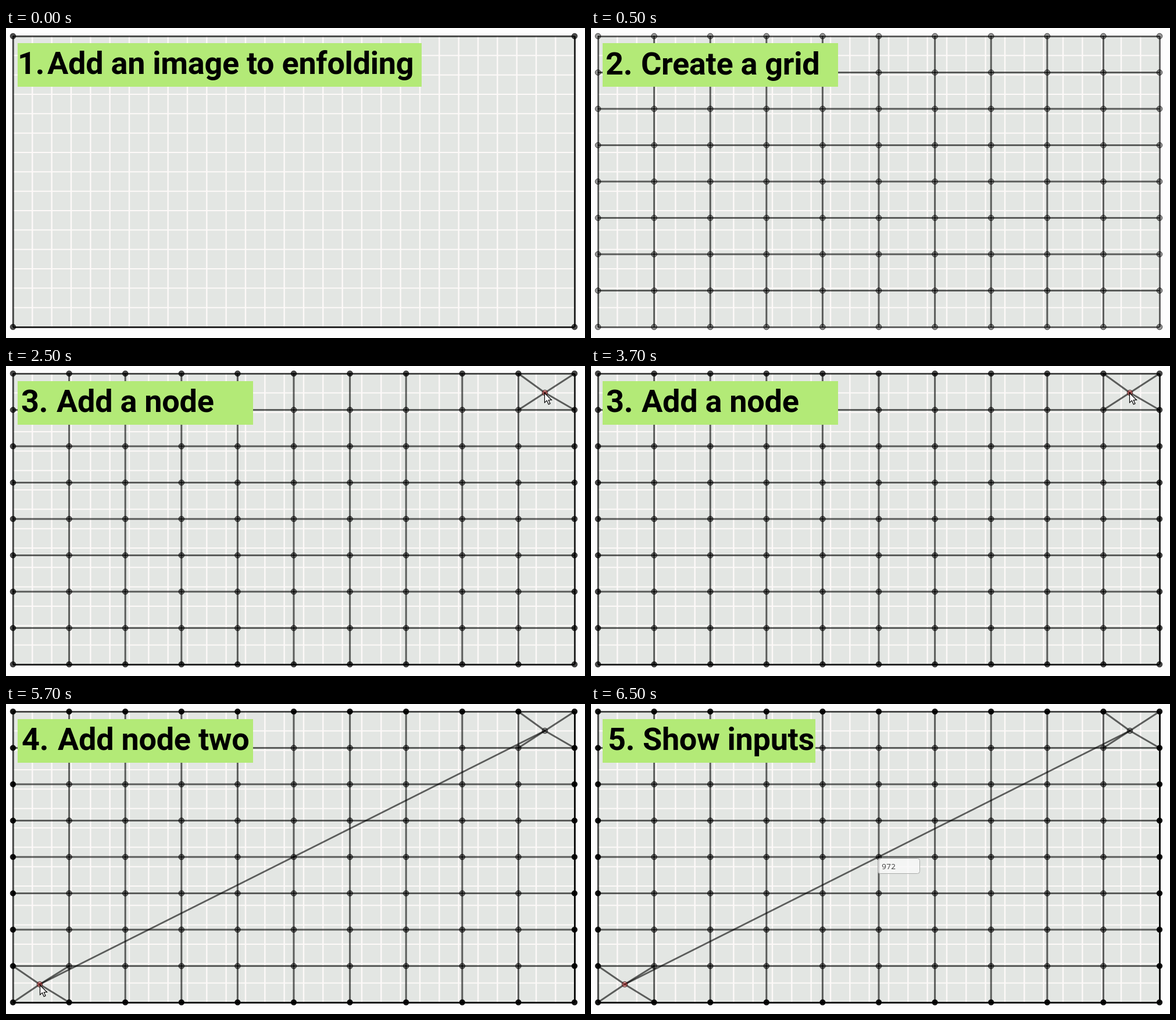
An HTML page with a canvas for the animation above (8 s loop, 996x533 px).

```html
<!DOCTYPE html>
<html lang="en">
<head>
<meta charset="utf-8">
<title>Grid steps</title>
<style>
html, body { margin: 0; width: 100%; height: 100%; overflow: hidden; background: #fdfdfd; }
canvas { display: block; }
</style>
</head>
<body>
<canvas id="stage" width="996" height="533"></canvas>
<script>
const ctx = document.getElementById('stage').getContext('2d');
const LOOP = 8000;
const LEFT = 12, RIGHT = 978, HEIGHT = 500, COLS = 10, ROWS = 8;
const CELL_W = (RIGHT - LEFT) / COLS, CELL_H = HEIGHT / ROWS;
const NODE_1 = [927, 46], NODE_2 = [58, 482];

// edge: passes over the outer frame; rim / inner: node opacity
const steps = [
  { at: 0, top: 14, edge: 2, rim: .7, num: '1.', numX: 20, text: 'Add an image to enfolding', textX: 71, base: 79, box: 695 },
  { at: 500, top: 14, grid: true, edge: 1, rim: .4, inner: .4, num: '2.', numX: 25, text: 'Create a grid', textX: 86, base: 80, box: 405 },
  { at: 2500, top: 13, grid: true, edge: 2, rim: .72, inner: .52, num: '3.', numX: 26, text: 'Add a node', textX: 87, base: 79, box: 405, nodes: 1, cursor: [926, 46] },
  { at: 4500, top: 13, grid: true, edge: 3, rim: .93, inner: .52, num: '4.', numX: 27, text: 'Add node two', textX: 89, base: 79, box: 405, nodes: 2, cursor: [58, 483] },
  { at: 6500, top: 13, grid: true, edge: 3, rim: .93, inner: .52, num: '5.', numX: 29, text: 'Show inputs', textX: 89, base: 79, box: 366, nodes: 2, input: '972' }
];

function line(x1, y1, x2, y2, color = 'rgba(0,0,0,.6)', width = 3) {
  ctx.strokeStyle = color;
  ctx.lineWidth = width;
  ctx.beginPath();
  ctx.moveTo(x1, y1);
  ctx.lineTo(x2, y2);
  ctx.stroke();
}

function node(x, y, alpha, rgb = '0,0,0') {
  ctx.beginPath();
  ctx.arc(x, y, 4.8, 0, Math.PI * 2);
  ctx.fillStyle = `rgba(${rgb},${alpha})`;
  ctx.fill();
  ctx.strokeStyle = 'rgba(0,0,0,.65)';
  ctx.lineWidth = 1;
  ctx.stroke();
}

function drawPaper(top) {
  const pitch = 100 / 3, bottom = top + HEIGHT;
  ctx.fillStyle = '#fdfdfd';
  ctx.fillRect(0, 0, 996, 533);
  ctx.fillStyle = '#e3e6e3';
  ctx.fillRect(LEFT, top, RIGHT - LEFT, HEIGHT);
  for (let x = LEFT + pitch; x < RIGHT - 1; x += pitch) line(x, top, x, bottom, '#fdf9f8', 2.4);
  for (let y = top + pitch; y < bottom - 1; y += pitch) line(LEFT, y, RIGHT, y, '#fdf9f8', 2);
}

function drawFrame(s) {
  const bottom = s.top + HEIGHT;
  const y = s.top + .5, x = LEFT + .5;
  line(LEFT, y, RIGHT, y);
  line(x, s.top, x, bottom);
  if (s.edge > 1) {
    line(LEFT, y - 1, RIGHT, y - 1, 'rgba(0,0,0,.65)', 1);
    line(x - 1, s.top, x - 1, bottom, 'rgba(0,0,0,.65)', 1);
  }
  for (let i = 0; i < s.edge; i++) {
    line(LEFT, bottom + .5, RIGHT, bottom + .5);
    line(RIGHT + .5, s.top, RIGHT + .5, bottom);
  }
}

function drawMesh(s) {
  const cols = s.grid ? COLS : 1, rows = s.grid ? ROWS : 1;
  const w = (RIGHT - LEFT) / cols, h = HEIGHT / rows;
  for (let c = 1; c < cols; c++) line(LEFT + c * w, s.top, LEFT + c * w, s.top + HEIGHT);
  for (let r = 1; r < rows; r++) line(LEFT, s.top + r * h, RIGHT, s.top + r * h);
  for (let c = 0; c <= cols; c++) {
    for (let r = 0; r <= rows; r++) {
      const rim = c % cols === 0 || r % rows === 0;
      node(LEFT + c * w, s.top + r * h, rim ? s.rim : s.inner);
    }
  }
}

function linkCell([x, y], col, row, top) {
  for (const c of [col, col + 1])
    for (const r of [row, row + 1]) line(x, y, LEFT + c * CELL_W, top + r * CELL_H);
}

function drawAdded(s) {
  if (!s.nodes) return;
  const red = '205,50,50';
  linkCell(NODE_1, COLS - 1, 0, s.top);
  if (s.nodes === 2) {
    linkCell(NODE_2, 0, ROWS - 1, s.top);
    line(...NODE_1, ...NODE_2);
    node(...NODE_1, .4);
    node(...NODE_2, .45, red);
  } else {
    node(...NODE_1, .45, red);
  }
}

function drawCursor([x, y]) {
  const arrow = new Path2D('M0 0V16.5L3.9 12.9L6.8 19.4L9.5 18.2L6.8 12H12Z');
  ctx.save();
  ctx.translate(x + .5, y + .5);
  ctx.fillStyle = '#fff';
  ctx.fill(arrow);
  ctx.strokeStyle = '#000';
  ctx.lineWidth = 1.2;
  ctx.stroke(arrow);
  ctx.restore();
}

function drawInput(text) {
  ctx.beginPath();
  ctx.roundRect(493.5, 265.5, 72, 26, 4);
  ctx.fillStyle = 'rgba(250,250,250,.75)';
  ctx.fill();
  ctx.strokeStyle = '#a9aba9';
  ctx.lineWidth = 1;
  ctx.stroke();
  ctx.font = '13.33px "Noto Sans Mono", monospace';
  ctx.letterSpacing = '0px';
  ctx.fillStyle = '#4c4c4c';
  ctx.fillText(text, 500, 284);
}

function drawLabel(s) {
  ctx.fillStyle = '#b3ea77';
  ctx.fillRect(20, 26, s.box, 75);
  ctx.font = '700 54px Roboto, sans-serif';
  ctx.letterSpacing = '-0.3px';
  ctx.fillStyle = '#000';
  ctx.fillText(s.num, s.numX, s.base);
  ctx.fillText(s.text, s.textX, s.base);
}

function draw(now) {
  const t = now % LOOP;
  const s = steps.findLast(step => step.at <= t) || steps[0];
  drawPaper(s.top);
  drawFrame(s);
  drawMesh(s);
  drawAdded(s);
  if (s.cursor) drawCursor(s.cursor);
  if (s.input) drawInput(s.input);
  drawLabel(s);
}

const start = performance.now();
function tick() {
  draw(performance.now() - start);
  requestAnimationFrame(tick);
}
tick();
</script>
</body>
</html>
```
